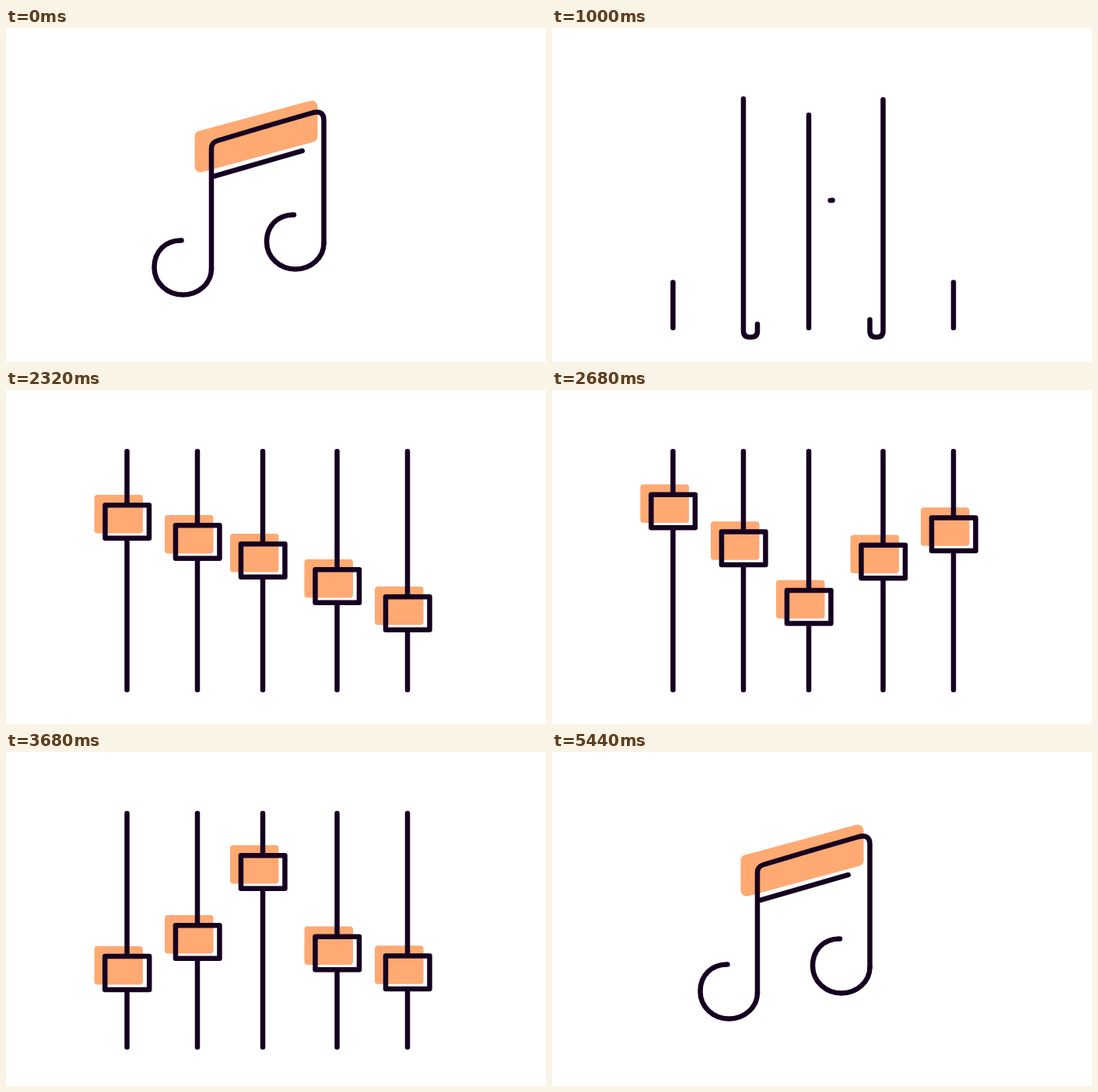
Recreate the animation shown at these times as an HTML page. Size 694x430 px, loop 5520 ms.

```html
<!DOCTYPE html>
<html lang="en">
<head>
<meta charset="utf-8">
<title>Music and mixer</title>
<style>
  html, body { margin: 0; width: 100%; height: 100%; overflow: hidden; background: #fff; }
  svg { display: block; width: 694px; height: 430px; }
  .ink { fill: none; stroke: #160021; stroke-width: 6.5; stroke-linecap: round; stroke-linejoin: round; }
  .pad { fill: #ffa973; }
  #beam { stroke: #ffa973; stroke-width: 15; stroke-linejoin: round; }
</style>
</head>
<body>
<svg viewBox="0 0 694 430" id="stage">
  <mask id="gaps" maskUnits="userSpaceOnUse" x="0" y="0" width="694" height="430">
    <rect width="694" height="430" fill="#fff"/>
  </mask>
  <polygon id="beam" class="pad"/>
  <g id="pads"></g>
  <g id="lines" class="ink" mask="url(#gaps)">
    <path id="snakeL" d="M334 126.5L272 145Q264 147.5 264 155V390q0 8-8 8h-2q-8 0-8-8V79"/>
    <path id="snakeR" d="M334 126.5L394.5 109Q408.5 105.5 408.5 119V390q0 8 8 8h1q8 0 8-8V79"/>
  </g>
  <g class="ink">
    <path id="curlL" d="M264 310C264 329 247 343.5 227.5 343.5S190.5 329 190.5 308C190.5 288 205 273 225.5 273.5"/>
    <path id="curlR" transform="translate(144.5 -33)" d="M264 310C264 329 247 343.5 227.5 343.5S190.5 329 190.5 308C190.5 288 205 273 225.5 273.5"/>
    <line id="bar"/>
  </g>
  <g id="boxes" class="ink"></g>
</svg>
<script>
const LOOP = 5520, TOP = 79, BOTTOM = 386, SPAN = BOTTOM - TOP;
const XS = [155.5, 246, 330, 425.5, 516];

// Slider tops, each pose reached between its two times
const POSES = [
  { from: 0, to: 1, y: [254, 184, 150, 220, 250] },
  { from: 1720, to: 2300, y: [145, 171, 195, 228, 263] },
  { from: 2380, to: 2880, y: [127, 182, 275, 186, 127] },
  { from: 2900, to: 3450, y: [270, 228, 132, 244, 270] },
  { from: 3540, to: 4080, y: [130, 115, 105, 112, 120] }
];

const $ = id => document.getElementById(id);
const prog = (t, from, dur) => Math.min(1, Math.max(0, (t - from) / dur));
const mix = (a, b, p) => a + (b - a) * p;
const inOut = p => p < .5 ? 4 * p ** 3 : 1 - 4 * (1 - p) ** 3;
const out = p => 1 - (1 - p) ** 3;
const backIn = (p, s) => (s + 1) * p ** 3 - s * p ** 2;
const backOut = (p, s) => 1 - backIn(1 - p, s);

function add(parent, tag, attrs) {
  const el = document.createElementNS('http://www.w3.org/2000/svg', tag);
  set(el, attrs);
  return parent.appendChild(el);
}
function set(el, attrs) {
  for (const k in attrs) el.setAttribute(k, attrs[k]);
}
function show(el, on) {
  el.style.display = on ? '' : 'none';
}
function trim(el, a, b) {
  show(el, b - a > .5);
  set(el, { 'stroke-dasharray': `${b - a} 2000`, 'stroke-dashoffset': -a });
}
function place(el, x, y, s) {
  show(el, s > .01);
  set(el, { transform: `translate(${x} ${y}) scale(${Math.max(s, .01)})` });
}

const sliders = XS.map(x => ({
  x,
  line: add($('lines'), 'line', { x1: x, x2: x }),
  pad: add($('pads'), 'rect', { class: 'pad', x: -31.25, y: -24.75, width: 62.5, height: 49.5, rx: 4 }),
  gap: add($('gaps'), 'rect', { x: -29, y: -22, width: 58, height: 44, fill: '#000' }),
  box: add($('boxes'), 'rect', { x: -28.25, y: -21.25, width: 56.5, height: 42.5 })
}));

// below: path length between the note's stem end and the snake's end
const stems = [['L', 419], ['R', 451]].map(([side, below]) => {
  const snake = $('snake' + side), curl = $('curl' + side);
  const len = snake.getTotalLength();
  return { snake, curl, len, rest: len - below, curlLen: curl.getTotalLength() };
});

function drawStems(t) {
  for (const { snake, curl, len, rest, curlLen } of stems) {
    if (t < 1400) {
      const head = mix(rest, len, inOut(prog(t, 200, 1000)));
      const tail = mix(0, len - SPAN, inOut(prog(t, 200, 1160)));
      trim(snake, tail, head);
      trim(curl, 0, curlLen * (1 - inOut(prog(t, 200, 380))));
    } else {
      const d = (rest + curlLen) * inOut(prog(t, 4600, 820));
      trim(snake, 0, Math.min(d, rest));
      trim(curl, 0, Math.max(0, d - rest));
    }
  }
}

function drawBeam(t) {
  const p = t < 1400 ? 1 - inOut(prog(t, 200, 420)) : inOut(prog(t, 4760, 640));
  const x0 = mix(393, 250, p), x1 = 393;
  const y = (x, base) => base - .271 * (x - 250);
  show($('beam'), p > 0.002);
  set($('beam'), {
    points: [[x0, y(x0, 139.8)], [x1, y(x1, 139.8)], [x1, y(x1, 178.2)], [x0, y(x0, 178.2)]].join(' ')
  });
}

function drawBar(t) {
  let p, x, y, deg;
  if (t < 1400) {
    const q = inOut(prog(t, 200, 980));
    p = 1 - q;
    x = mix(324, 360, q); y = mix(174.5, 223, q); deg = mix(-16, -4, q);
  } else {
    p = out(prog(t, 4420, 820));
    x = mix(316, 324, p); y = mix(165, 174.5, p); deg = mix(-29, -16, p);
  }
  const half = 59 * p, a = deg * Math.PI / 180;
  const dx = half * Math.cos(a), dy = half * Math.sin(a);
  show($('bar'), half > .5);
  set($('bar'), { x1: x - dx, y1: y - dy, x2: x + dx, y2: y + dy });
}

function sliderY(t, i) {
  return POSES.reduce((y, k) => mix(y, k.y[i], inOut(prog(t, k.from, k.to - k.from))), 0);
}

function drawSliders(t) {
  const retract = prog(t, 3440, 1010) ** 2.75;
  sliders.forEach(({ x, line, pad, gap, box }, i) => {
    const snaked = i % 2 === 1;
    const grow = snaked ? +(t >= 1400)
      : inOut(i === 2 ? prog(t, 400, 858) : prog(t, 700, 830));
    show(line, grow > 0 && retract < 1);
    set(line, { y1: BOTTOM - SPAN * grow, y2: BOTTOM - SPAN * retract });

    const leave = prog(t, 3660 + 100 * i, 420);
    const enter = prog(t, 1120, 360);
    const s = leave > 0 ? 1 - backIn(leave, 3.8) : backOut(enter, 2.2);
    const padS = inOut(prog(t, 1240, 300)) * (1 - inOut(Math.min(1, leave * 1.4)));
    const y = sliderY(t, i) + 24.5;
    place(box, x + .2, y, s);
    place(gap, x + .2, y, s);
    place(pad, x - 10.75, y - 9.75, padS);
  });
}

function draw(t) {
  drawStems(t);
  drawBeam(t);
  drawBar(t);
  drawSliders(t);
}

const start = performance.now();
function tick() {
  draw((performance.now() - start) % LOOP);
  requestAnimationFrame(tick);
}
tick();
</script>
</body>
</html>
```
